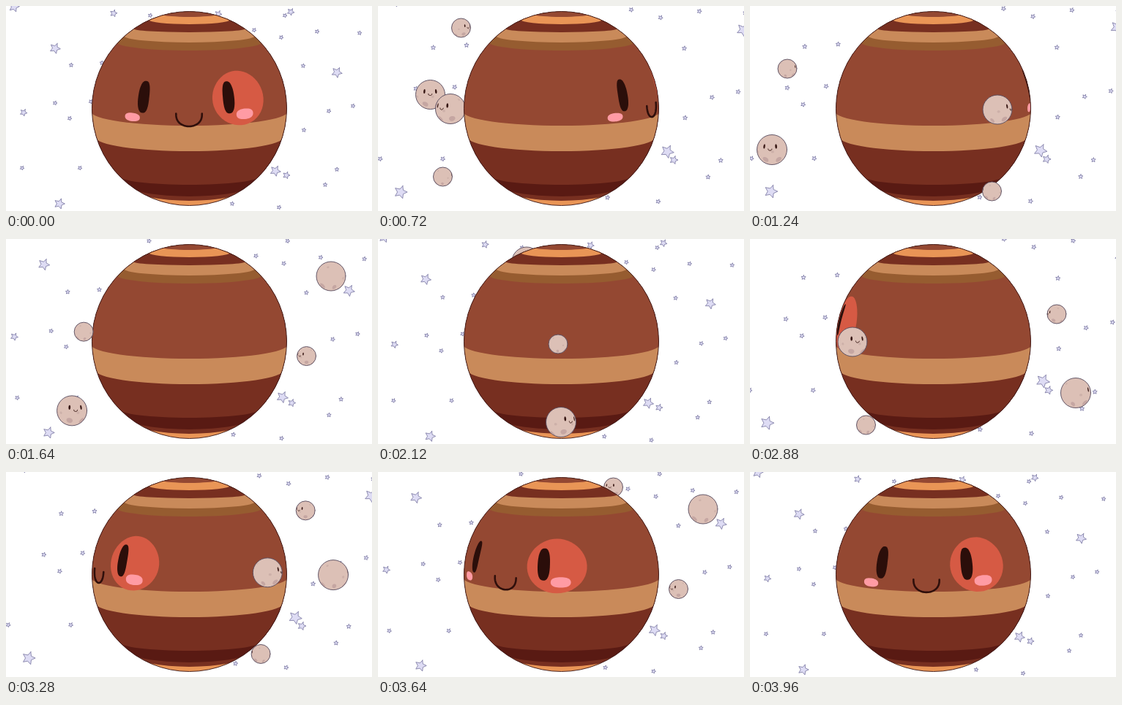
Write an HTML page with a canvas that moves like this. It is 500 by 281 pixels and loops after 4 s.

```html
<!DOCTYPE html>
<html lang="en">
<head>
<meta charset="utf-8">
<title>Smiling planet</title>
<style>
  html, body { margin: 0; width: 100%; height: 100%; overflow: hidden; background: #fff; }
  canvas { display: block; width: 100%; height: 100%; }
</style>
</head>
<body>
<canvas id="stage" width="500" height="281"></canvas>
<script>
const ctx = document.getElementById('stage').getContext('2d');
const LOOP = 4000, STEP = 40, TAU = Math.PI * 2, RAD = Math.PI / 180;
const planet = { x: 250.5, y: 140.5, r: 133, tilt: 8.7 };

// Bands from top to bottom: colour, height of the lower edge in the middle and at the rim
const bands = [
  ['#944832', 15, 12], ['#e99556', 25, 19], ['#772f20', 36, 31], ['#c98a5a', 50, 41],
  ['#965c30', 61, 50], ['#944832', 164, 145], ['#c98a5a', 199, 180],
  ['#772f20', 245, 233], ['#591a13', 261, 246], ['#772f20', 267, 252], ['#e99556', 290, 280]
];

// Star layers: zoom amount, vanishing point, radius, positions
const layers = [
  { zoom: .1, x: 254, y: 374, r: 3, at: [
    [197, 13], [381, 13], [339, 33], [376, 43], [425, 35], [483, 37], [89, 81], [131, 78],
    [406, 82], [67, 133], [87, 154], [116, 131], [441, 144], [474, 137], [407, 170],
    [452, 224], [436, 245], [309, 271], [373, 276], [22, 222], [101, 222]] },
  { zoom: .195, x: 251, y: 363, r: 5, at: [[147, 10], [290, 11], [389, 8], [24, 146], [383, 232]] },
  { zoom: .287, x: 252, y: 339, r: 7.4, at: [[11, 1], [67, 58], [452, 91], [368, 226], [73, 271]] }
];

// Moons: radius, orbit period, time in front, face turn (time, degrees per ms), path of [ms, x, y]
const moons = [
  { r: 13, period: 4000, front: [1400, 2860], face: [3980, .065], path: [
    [100, 230, 23], [720, 113.5, 30], [1240, 51, 86], [1680, 115, 130], [2120, 246, 144],
    [2880, 419, 103], [3260, 412, 55], [3640, 321.5, 21]] },
  { r: 20, period: 2000, front: [760, 1400], face: [725, .13], path: [
    [0, 258, 30], [120, 203, 31], [420, 92, 72], [720, 71.5, 121.5], [880, 140, 141],
    [1240, 338, 142], [1440, 418, 104], [1640, 444, 51]] },
  { r: 20.5, period: 4000, front: [1400, 2860], face: [1380, .055], path: [
    [40, 245, 89], [380, 163, 97], [720, 99, 141], [1240, 30, 197], [1680, 100, 238],
    [2120, 250, 251], [2880, 445, 211], [3260, 450, 144], [3640, 345, 100]] },
  { r: 13, period: 2000, front: [760, 1400], face: [1985, .13], path: [
    [0, 280, 130], [120, 240, 127], [400, 92, 160], [560, 62, 195], [720, 88.5, 234],
    [880, 158.5, 255], [1240, 330.5, 254], [1450, 408, 212], [1640, 410.5, 160.5]] }
];

function project(ball, lon, lat) {
  const a = lon * RAD, b = lat * RAD, k = ball.tilt * RAD;
  const depth = Math.cos(b) * Math.cos(a);
  let x = Math.cos(b) * Math.sin(a);
  let y = depth * Math.sin(k) - Math.sin(b) * Math.cos(k);
  const z = Math.sin(b) * Math.sin(k) + depth * Math.cos(k);
  if (z < 0) { // beyond the rim: pull the point onto it
    const d = Math.hypot(x, y) || 1;
    x /= d; y /= d;
  }
  return { x: ball.x + ball.r * x, y: ball.y + ball.r * y, seen: z > 0 };
}

function trace(points) {
  ctx.beginPath();
  points.forEach(p => ctx.lineTo(p.x, p.y));
}

function patch(ball, lon, lat, w, h, color, power = 1) {
  const bend = v => Math.sign(v) * Math.abs(v) ** power;
  const points = Array.from({ length: 48 }, (_, i) => {
    const a = i / 48 * TAU;
    return project(ball, lon + w * bend(Math.cos(a)), lat + h * bend(Math.sin(a)));
  });
  if (!points.some(p => p.seen)) return;
  trace(points);
  ctx.fillStyle = color;
  ctx.fill();
}

function smile(ball, lon, lat, w, h, width) {
  const points = Array.from({ length: 25 }, (_, i) => {
    const a = i / 24 * Math.PI;
    return project(ball, lon + w * Math.cos(a), lat - h * Math.max(0, Math.sin(a)) ** .8);
  }).filter(p => p.seen);
  trace(points);
  ctx.strokeStyle = '#2f0f0b';
  ctx.lineWidth = width;
  ctx.lineCap = 'round';
  ctx.stroke();
}

function disc(ball) {
  ctx.beginPath();
  ctx.arc(ball.x, ball.y, ball.r, 0, TAU);
}

function outline(ball, color) {
  disc(ball);
  ctx.strokeStyle = color;
  ctx.lineWidth = .9;
  ctx.stroke();
}

function drawStars(t) {
  const swing = (1 - Math.cos(t / 2000 * TAU)) / 2;
  ctx.fillStyle = '#dedcf4';
  ctx.strokeStyle = '#77749f';
  ctx.lineWidth = .8;
  ctx.lineJoin = 'round';
  for (const layer of layers) {
    const s = 1 + layer.zoom * swing;
    layer.at.forEach(([x, y], n) => {
      const cx = layer.x + (x - layer.x) * s, cy = layer.y + (y - layer.y) * s;
      const turn = .25 + Math.sin(n * 7) * .25;
      trace(Array.from({ length: 10 }, (_, i) => {
        const a = turn - TAU / 4 + i * TAU / 10, r = layer.r * s * (i % 2 ? .48 : 1);
        return { x: cx + r * Math.cos(a), y: cy + r * Math.sin(a) };
      }));
      ctx.closePath();
      ctx.fill();
      ctx.stroke();
    });
  }
}

function drawPlanet(t) {
  const { x, y, r } = planet;
  ctx.save();
  disc(planet);
  ctx.clip();
  for (const [color, mid, rim] of [...bands].reverse()) {
    const w = Math.sqrt(Math.max(0, r * r - (rim - y) ** 2)) + 1;
    ctx.beginPath();
    ctx.rect(0, 0, 500, rim + .3);
    ctx.ellipse(x, rim, w, mid - rim, 0, 0, Math.PI);
    ctx.fillStyle = color;
    ctx.fill();
  }
  const turn = t / LOOP * 360, lon = wrap(turn + 5.5 * Math.sin(turn * RAD), 360);
  patch(planet, lon + 32.6, 13.9, 18.5, 16.4, '#d65a44');
  for (const side of [-29, 24.6]) patch(planet, lon + side, 14.6, 3.8, 9.6, '#2b0e0a', .8);
  patch(planet, lon - 36, 2, 5.4, 2.5, '#ff9ba4', .85);
  patch(planet, lon + 35, 4, 6, 3.1, '#ff9ba4', .85);
  smile(planet, lon - .2, 5.6, 7.7, 7.5, 2.6);
  ctx.restore();
  outline(planet, '#3b1a1c');
}

function wrap(v, span) {
  return v - span * Math.round(v / span);
}

// Smooth closed curve through timed points
function along(path, period, t) {
  const n = path.length;
  const knot = i => {
    const [time, x, y] = path[(i + n) % n];
    return [time + Math.floor(i / n) * period, x, y];
  };
  let i = n - 1;
  while (i >= 0 && path[i][0] > t) i--;
  const [p, a, b, q] = [-1, 0, 1, 2].map(d => knot(i + d));
  const span = b[0] - a[0], u = (t - a[0]) / span;
  const axis = k => {
    const m = (b[k] - p[k]) / (b[0] - p[0]) * span;
    const o = (q[k] - a[k]) / (q[0] - a[0]) * span;
    const c = b[k] - a[k];
    return a[k] + u * (m + u * (3 * c - 2 * m - o + u * (m + o - 2 * c)));
  };
  return { x: axis(1), y: axis(2) };
}

function drawMoon(moon, t) {
  const { r, period, face: [start, rate] } = moon;
  const ball = { ...along(moon.path, period, t), r, tilt: 0 };
  const lon = wrap(t - start, period) * rate;
  disc(ball);
  ctx.fillStyle = '#dcc0b6';
  ctx.fill();
  for (let i = 0; i < 5; i++) {
    patch(ball, lon + 45 + i * 72, -42 - 8 * (i % 2), 16 - 4 * (i % 2), 13, '#c5a6a2');
    patch(ball, lon + 10 + i * 72, i % 2 ? 38 : -8, 6, 5, '#cdb0a9');
  }
  for (const side of [-24, 24]) patch(ball, lon + side, 13, 4, 9, '#351512');
  if (Math.abs(lon) < 80) smile(ball, lon, 3, 7, 6, r > 15 ? 1 : .7);
  outline(ball, '#55495c');
}

function draw(now) {
  const t = Math.floor((now % LOOP) / STEP + .001) * STEP;
  ctx.fillStyle = '#fff';
  ctx.fillRect(0, 0, 500, 281);
  drawStars(t);
  const drawSide = inFront => moons.forEach(moon => {
    const time = t % moon.period, [from, to] = moon.front;
    if ((time > from && time < to) === inFront) drawMoon(moon, time);
  });
  drawSide(false);
  drawPlanet(t);
  drawSide(true);
}

const begin = performance.now();
function tick() {
  draw(performance.now() - begin);
  requestAnimationFrame(tick);
}
tick();
</script>
</body>
</html>
```
